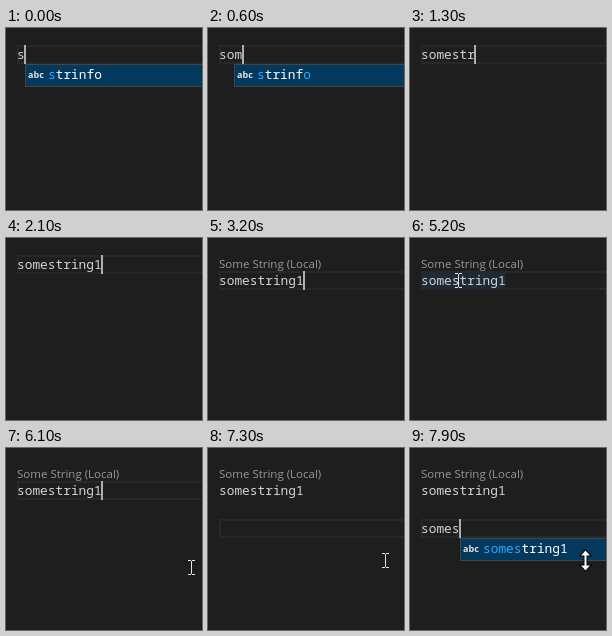
Write an HTML page with a canvas that moves like this. It is 196 px wide and 182 px high and loops after 8000 ms.

```html
<!DOCTYPE html>
<html>
<head>
<meta charset="utf-8">
<style>
html, body { margin: 0; width: 196px; height: 182px; overflow: hidden; background: #1e1e1e; }
canvas { display: block; }
</style>
</head>
<body>
<canvas id="stage" width="196" height="182"></canvas>
<script>
const ctx = document.getElementById('stage').getContext('2d');
const LOOP = 8000, LEFT = 11, CHAR = 7.7;
const CODE = '12.83px "Noto Sans Mono", monospace';
const LENS = '11.5px "Open Sans", sans-serif';
const ICON = 'bold 9px "Open Sans", sans-serif';

// [start time, typed text]
const firstWord = [[0, 's'], [100, 'so'], [400, 'som'], [800, 'some'], [1000, 'somes'],
  [1300, 'somestr'], [1500, 'somestri'], [1600, 'somestrin'], [1900, 'somestring'], [2000, 'somestring1']];
const secondWord = [[0, ''], [7400, 's'], [7500, 'so'], [7800, 'some'], [7900, 'somes']];
const caretOff = [[2500, 2900], [3500, 4200], [4800, 5400], [6600, 7200], [7300, 7400]];
// [time, x, y] of the pointer
const pointerPath = [[4200, 92, 6], [4500, 46, 46], [4700, 30, 50], [5000, 46, 43], [5200, 48, 42],
  [5400, 92, 24], [5600, 146, 11], [5800, 150, 14], [6000, 180, 100], [6100, 185, 119],
  [7100, 185, 119], [7300, 177, 112], [7500, 175, 112], [8000, 175, 112]];

const within = (t, a, b) => t >= a && t < b;
const current = (steps, t) => steps.filter(s => s[0] <= t).pop()[1];
const column = n => LEFT + CHAR * n;

function rect(color, x, y, w, h) {
  ctx.fillStyle = color;
  ctx.fillRect(x, y, w, h);
}

function text(str, x, y, color, font = CODE) {
  ctx.font = font;
  ctx.fillStyle = color;
  ctx.fillText(str, x, y);
}

function lineFrame(y) {
  ctx.strokeStyle = '#282828';
  ctx.lineWidth = 2;
  ctx.strokeRect(LEFT + 1, y + 1, 220, 17);
}

function popup(col, y, typed, items) {
  const x = Math.round(column(col));
  const h = 22 * items.length;
  rect('#454545', x, y, 220, h + 1);
  rect('#252526', x + 1, y + 1, 220, h - 1);
  rect('#04395e', x + 1, y + 1, 220, 21);
  items.forEach((item, row) => {
    const base = y + 15 + row * 22;
    text('abc', x + 3, base - 1, '#e4e4e4', ICON);
    let matched = 0;
    [...item].forEach((ch, i) => {
      const hit = ch === typed[matched];
      if (hit) matched++;
      const plain = row ? '#d4d4d4' : '#ffffff';
      text(ch, x + 23 + i * CHAR, base, hit ? '#2aaaff' : plain);
    });
  });
}

function pointerAt(t) {
  const i = pointerPath.findIndex(p => p[0] > t);
  const [t0, x0, y0] = pointerPath[i - 1], [t1, x1, y1] = pointerPath[i];
  const k = (t - t0) / (t1 - t0);
  return [Math.round(x0 + (x1 - x0) * k), Math.round(y0 + (y1 - y0) * k)];
}

function iBeam(x, y) {
  const c = '#e6e6e6';
  rect(c, x, y - 6, 1, 13);
  for (const edge of [y - 7, y + 7]) {
    rect(c, x - 3, edge, 3, 1);
    rect(c, x + 1, edge, 3, 1);
  }
}

function resizeArrow(x, y) {
  ctx.beginPath();
  [[0, -10], [4.5, -5], [1, -5], [1, 5], [4.5, 5], [0, 10], [-4.5, 5], [-1, 5], [-1, -5], [-4.5, -5]]
    .forEach(([dx, dy]) => ctx.lineTo(x + 0.5 + dx, y + 0.5 + dy));
  ctx.closePath();
  ctx.lineWidth = 2;
  ctx.strokeStyle = '#000';
  ctx.stroke();
  ctx.fillStyle = '#fff';
  ctx.fill();
}

function draw(t) {
  rect('#1e1e1e', 0, 0, 196, 182);
  const word = current(firstWord, t), second = current(secondWord, t);
  const wordY = t < 2500 ? 17 : 33;
  const lower = t >= 7200;
  const lineY = !lower ? wordY : t < 7300 ? 52 : 71;
  const typed = lower ? second : word;

  lineFrame(lineY);
  if (within(t, 4700, 5400)) rect('#202a35', LEFT, wordY, CHAR * 11, 19);
  if (t >= 2500) text('Some String (Local)', LEFT, 30, '#999999', LENS);
  text(word, LEFT, wordY + 14, '#d4d4d4');
  text(second, LEFT, 85, '#d4d4d4');

  if (!caretOff.some(([a, b]) => within(t, a, b)))
    rect('#aeafad', Math.floor(column(typed.length)), lineY, 2, 19);

  if (t < 800) popup(t < 200 ? 1 : 2, 36, word, ['strinfo']);
  if (t >= 7500) {
    const items = t < 7800 ? ['somestring1', 'strinfo'] : ['somestring1'];
    popup(t < 7900 ? 2 : 5, 90, second, items);
  }

  if (t >= 4200) {
    const [x, y] = pointerAt(t);
    (t >= 7800 ? resizeArrow : iBeam)(x, y);
  }
}

function tick() {
  draw(Math.floor(performance.now() % LOOP / 100) * 100);
  requestAnimationFrame(tick);
}
tick();
</script>
</body>
</html>
```
